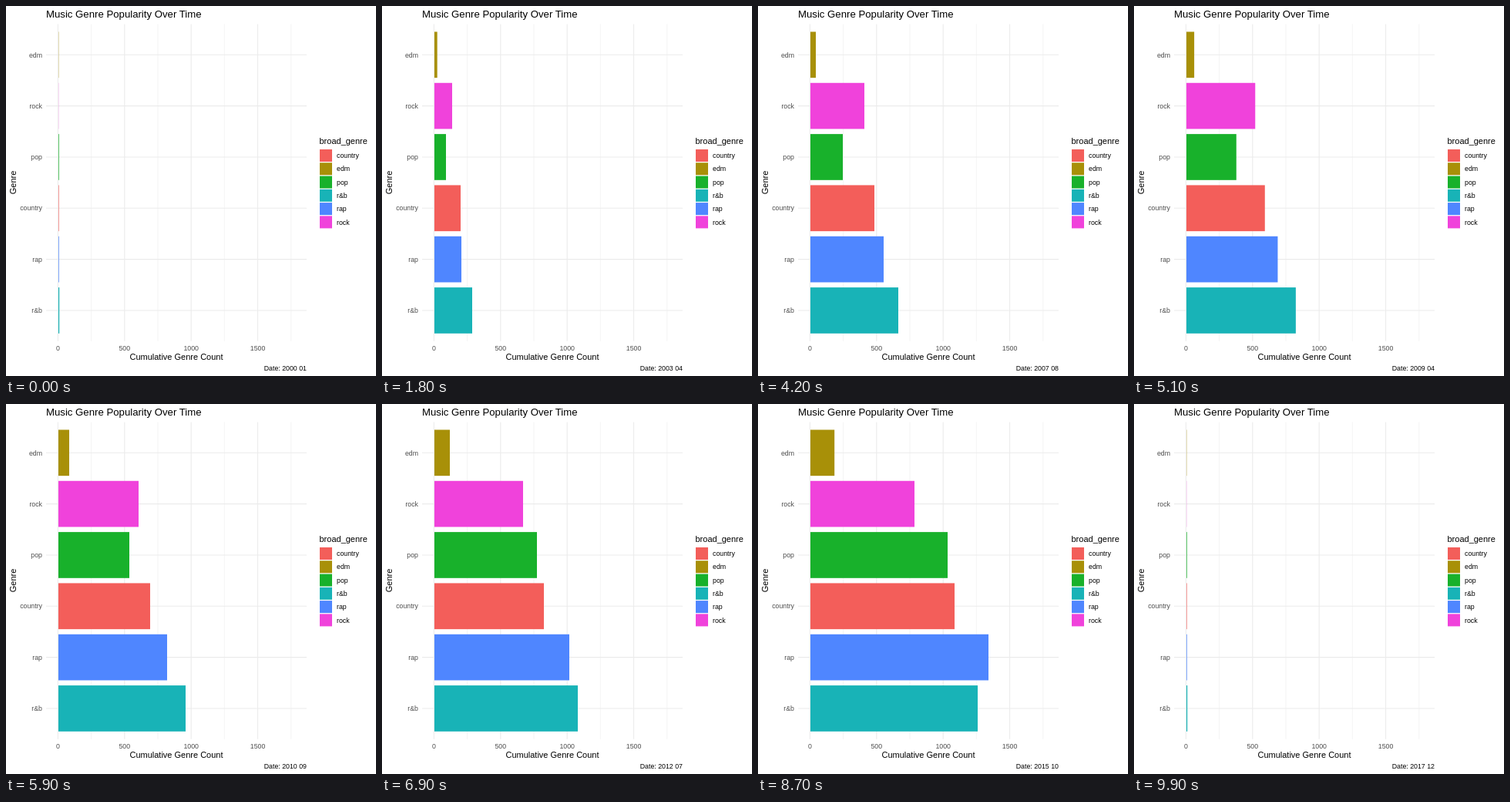
Recreate the animation shown at these times as an HTML page. Size 480 px wide and 480 px high, loop 10 s.

```html
<!DOCTYPE html>
<html lang="en">
<head>
<meta charset="utf-8">
<title>Music Genre Popularity Over Time</title>
<style>
  html, body { margin: 0; width: 100%; height: 100%; overflow: hidden; background: #fff; }
  svg { display: block; width: 480px; height: 480px; font: 11px "Liberation Sans", Arial, sans-serif; }
  .small { font-size: 8.8px; }
  .tick { font-size: 8.8px; fill: #4d4d4d; }
  .mid { text-anchor: middle; }
  .end { text-anchor: end; }
  .grid line { stroke: #ebebeb; stroke-width: 1.07; }
  .grid .minor { stroke-width: .53; }
</style>
</head>
<body>
<svg viewBox="0 0 480 480">
  <g class="grid" id="grid"></g>
  <g id="bars"></g>
  <g id="labels"></g>
  <text x="52" y="15" font-size="13.2">Music Genre Popularity Over Time</text>
  <text class="mid" x="221" y="459">Cumulative Genre Count</text>
  <text class="mid" transform="translate(13.3 229) rotate(-90)">Genre</text>
  <text x="406.5" y="179">broad_genre</text>
  <text class="small end" id="date" x="390" y="473"></text>
</svg>
<script>
const FRAMES = 100, STEP = 100, MONTHS = 216;
const LEFT = 68, ZERO = 67.4, UNIT = 0.1728;
const TOP = 63.3, ROW = 66.33, BAR = ROW * 0.9;

// Right edge of each bar at the key times, counted in steps.
const keyTimes = [0, 18, 42, 59, 69, 87, 98];
const genres = [
  { name: 'edm', color: '#a89008', edges: [68.3, 71.7, 75, 82, 88, 99.2, 107] },
  { name: 'rock', color: '#f042db', edges: [68.2, 91, 138, 172, 183, 203, 213] },
  { name: 'pop', color: '#18b12b', edges: [68.7, 83, 110, 160, 201, 246, 271] },
  { name: 'country', color: '#f35e5a', edges: [68.6, 102, 151, 187, 210, 255, 282] },
  { name: 'rap', color: '#4f86ff', edges: [68.7, 103, 163, 209, 243, 299, 371] },
  { name: 'r&b', color: '#18b3b7', edges: [69.2, 117, 182, 233, 254, 285, 303] }
];

function add(parent, tag, attrs, text = '') {
  const el = document.createElementNS('http://www.w3.org/2000/svg', tag);
  for (const key in attrs) el.setAttribute(key, attrs[key]);
  el.textContent = text;
  return document.getElementById(parent).appendChild(el);
}

// Monotone cubic through the key points.
function curve(xs, ys) {
  const last = xs.length - 1;
  const slopes = ys.slice(1).map((y, i) => (y - ys[i]) / (xs[i + 1] - xs[i]));
  const tangents = xs.map((_, i) => {
    if (i === 0) return slopes[0];
    if (i === last) return slopes[last - 1];
    const a = slopes[i - 1], b = slopes[i];
    return 2 * a * b / (a + b);
  });
  return x => {
    let i = 0;
    while (i < last - 1 && x > xs[i + 1]) i++;
    const h = xs[i + 1] - xs[i], t = (x - xs[i]) / h, u = 1 - t;
    return u * u * ((1 + 2 * t) * ys[i] + t * h * tangents[i])
      + t * t * ((3 - 2 * t) * ys[i + 1] - u * h * tangents[i + 1]);
  };
}

for (let value = 0; value <= 1750; value += 250) {
  const x = ZERO + value * UNIT, major = value % 500 === 0;
  add('grid', 'line', { x1: x, x2: x, y1: 23.5, y2: 434.8, class: major ? '' : 'minor' });
  if (major) add('labels', 'text', { x, y: 447, class: 'tick mid' }, value);
}

genres.forEach((g, i) => {
  const y = TOP + i * ROW;
  add('grid', 'line', { x1: 52, x2: 390, y1: y, y2: y });
  add('labels', 'text', { x: 47, y: y + 3.2, class: 'tick end' }, g.name);
  g.rect = add('bars', 'rect', { x: LEFT, y: y - BAR / 2, height: BAR, fill: g.color });
  g.edge = curve(keyTimes, g.edges);
});

[...genres].sort((a, b) => a.name.replace('&', '').localeCompare(b.name.replace('&', '')))
  .sort((a, b) => (a.name === 'rap') - (b.name === 'rap') || 0);
['country', 'edm', 'pop', 'r&b', 'rap', 'rock'].forEach((name, i) => {
  const y = 186 + i * 17.28;
  const { color } = genres.find(g => g.name === name);
  add('labels', 'rect', { x: 407, y, width: 16, height: 16, fill: color });
  add('labels', 'text', { x: 429, y: y + 11.2, class: 'small' }, name);
});

const date = document.getElementById('date');
let shown = -1;

function draw(frame) {
  // The bars return to the start on the last step, while the date runs on.
  const pose = frame === FRAMES - 1 ? 0 : frame;
  for (const g of genres) g.rect.setAttribute('width', g.edge(pose) - LEFT);
  const month = Math.round(frame * (MONTHS - 1) / (FRAMES - 1));
  const year = 2000 + Math.floor(month / 12);
  date.textContent = `Date: ${year} ${String(month % 12 + 1).padStart(2, '0')}`;
}

const start = performance.now();
function tick() {
  const frame = Math.floor((performance.now() - start) / STEP) % FRAMES;
  if (frame !== shown) draw(shown = frame);
  requestAnimationFrame(tick);
}
tick();
</script>
</body>
</html>
```
